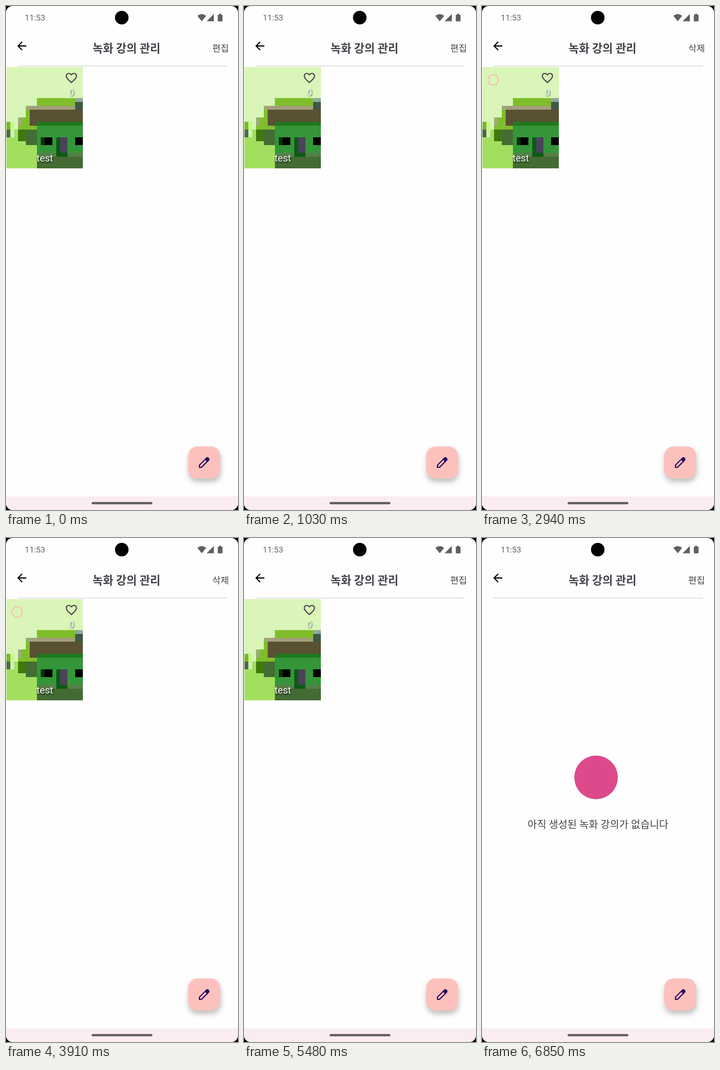
An HTML page that plays this animation: 480x1040 px, repeating every 6.88 s.

```html
<!DOCTYPE html>
<html lang="ko">
<head>
<meta charset="utf-8">
<style>
  html, body { margin: 0; width: 100%; height: 100%; overflow: hidden; background: #000; }
  svg { display: block; width: 100vw; height: 100vh; }
  text { font-family: Roboto, "Noto Sans CJK KR", "Noto Sans CJK", sans-serif; fill: #45414a; text-anchor: middle; }
  .shadowed { fill: #fff; text-shadow: 1px 1.5px 2.5px rgba(0, 0, 0, .75); }
  .fab { filter: drop-shadow(1.5px 7px 6px rgba(0, 0, 0, .25)); }
</style>
</head>
<body>
<svg viewBox="0 0 480 1040">
  <rect width="480" height="1040" rx="14" fill="#fefefe"/>
  <path d="M0 1012H480V1026A14 14 0 0 1 466 1040H14A14 14 0 0 1 0 1026Z" fill="#fbecf2"/>
  <rect x="177" y="1023.5" width="126" height="4.8" rx="2.4" fill="#625e62"/>

  <!-- Status bar -->
  <text x="60" y="30" font-size="16.8" style="fill:#646464">11:53</text>
  <circle cx="239.5" cy="24" r="14"/>
  <g fill="#606060">
    <path d="M396 20.5Q405 13 414 20.5L405 31.5Z"/>
    <path d="M430 16.5V31.5H415Z"/>
    <path d="M441 16H445V17.8H446.5Q448 17.8 448 19.3V30Q448 31.7 446.5 31.7H439.7Q438.2 31.7 438.2 30V19.3Q438.2 17.8 439.7 17.8H441Z"/>
  </g>

  <!-- App bar -->
  <path transform="translate(18.7 68.5) scale(1.167)" d="M20 11H7.83l5.59-5.59L12 4l-8 8 8 8 1.41-1.41L7.83 13H20z"/>
  <text x="249.3" y="96" font-size="23.33" font-weight="700">녹화 강의 관리</text>
  <text id="action" x="444" y="94" font-size="18.67">편집</text>
  <path d="M23.5 124H457" stroke="#d8d8da" stroke-width="1.3"/>

  <!-- Lecture card -->
  <g id="card">
    <g id="thumb" transform="translate(1.3 125.8) scale(7.875 8.05)" shape-rendering="crispEdges"></g>
    <path transform="translate(121.3 134.5) scale(1.167)" fill="#49454f" d="M16.5 3c-1.74 0-3.41.81-4.5 2.09C10.91 3.81 9.24 3 7.5 3 4.42 3 2 5.42 2 8.5c0 3.78 3.4 6.86 8.55 11.54L12 21.35l1.45-1.32C18.6 15.36 22 12.28 22 8.5 22 5.42 19.58 3 16.5 3zm-4.4 15.55l-.1.1-.1-.1C7.14 14.24 4 11.39 4 8.5 4 6.5 5.5 5 7.5 5c1.54 0 3.04.99 3.57 2.36h1.87C13.46 5.99 14.96 5 16.5 5c2 0 3.5 1.5 3.5 3.5 0 2.89-3.14 5.74-7.9 10.05z"/>
    <text class="shadowed" x="135.5" y="184.5" font-size="18.67">0</text>
    <text class="shadowed" x="80.3" y="321" font-size="20">test</text>
    <circle id="ring" cx="23.2" cy="152.4" r="10.6" fill="none" stroke="#f9bfb7" stroke-width="2.3"/>
  </g>

  <!-- Empty state -->
  <g id="empty">
    <circle cx="236" cy="494" r="45" fill="#dc4a8c"/>
    <text x="240" y="597.5" font-size="21">아직 생성된 녹화 강의가 없습니다</text>
  </g>

  <!-- Edit button -->
  <rect class="fab" x="377" y="909" width="66" height="66" rx="18.7" fill="#fcc1bc"/>
  <g transform="translate(399 953) rotate(-45)">
    <path d="M1.6 0L4.8-3.1H22V3.1H4.8Z" fill="none" stroke="#21005d" stroke-width="2.2"/>
    <path d="M21-4.2H25.5Q29-4.2 29 0T25.5 4.2H21Z" fill="#21005d"/>
  </g>
</svg>
<script>
const LOOP = 6880;
const EDIT_START = 2800, EDIT_END = 5300, CARD_GONE = 5520, EMPTY_SHOWN = 6000;
const byId = id => document.getElementById(id);
const action = byId('action'), card = byId('card'), ring = byId('ring'), empty = byId('empty');

// Pixel-art thumbnail on a 20 by 26 grid
const block = (fill, x, y, width, height) => {
  const rect = document.createElementNS('http://www.w3.org/2000/svg', 'rect');
  for (const [name, value] of Object.entries({ fill, x, y, width, height })) rect.setAttribute(name, value);
  byId('thumb').append(rect);
};
block('#d9f5b7', 0, 0, 20, 26);   // sky
block('#a2df5f', 0, 16, 8, 10);   // grass
block('#78b82b', 0, 14, 1, 2);
block('#4a6c3c', 0, 16, 1, 2);
block('#c5fa83', 1, 14, 1, 2);
block('#d0efb8', 1, 16, 1, 2);
block('#7fbe2b', 8, 8, 10, 2);    // trees
block('#9bab78', 3, 13, 1, 2);
block('#9bab78', 5, 10, 1, 1);
block('#7fbe2b', 4, 13, 2, 3);
block('#7fbe2b', 5, 11, 1, 2);
block('#7fbe2b', 3, 15, 5, 1);
block('#3f790e', 3, 16, 2, 3);
block('#446d33', 5, 16, 3, 4);
block('#a39f7c', 6, 10, 12, 1);   // roof and chimney
block('#91a89e', 18, 8, 2, 1);
block('#3e5845', 18, 9, 2, 2);
block('#595132', 6, 11, 14, 4);
block('#207b1d', 8, 14, 12, 1);
block('#349638', 8, 15, 12, 7);   // house
block('#0a300d', 9, 18, 1, 2);
block('#000000', 10, 18, 2, 2);
block('#000000', 18, 18, 2, 2);
block('#567f48', 8, 22, 12, 1);
block('#436b33', 8, 23, 12, 3);
block('#0a5b13', 13, 18, 3, 5);
block('#4a4259', 14, 18, 2, 4);

const show = (element, visible) => { element.style.display = visible ? '' : 'none'; };

function draw(now) {
  const time = now % LOOP;
  const editing = time >= EDIT_START && time < EDIT_END;
  action.textContent = editing ? '삭제' : '편집';
  show(ring, editing);
  show(card, time < CARD_GONE);
  show(empty, time >= EMPTY_SHOWN);
  requestAnimationFrame(draw);
}
draw(performance.now());
</script>
</body>
</html>
```
